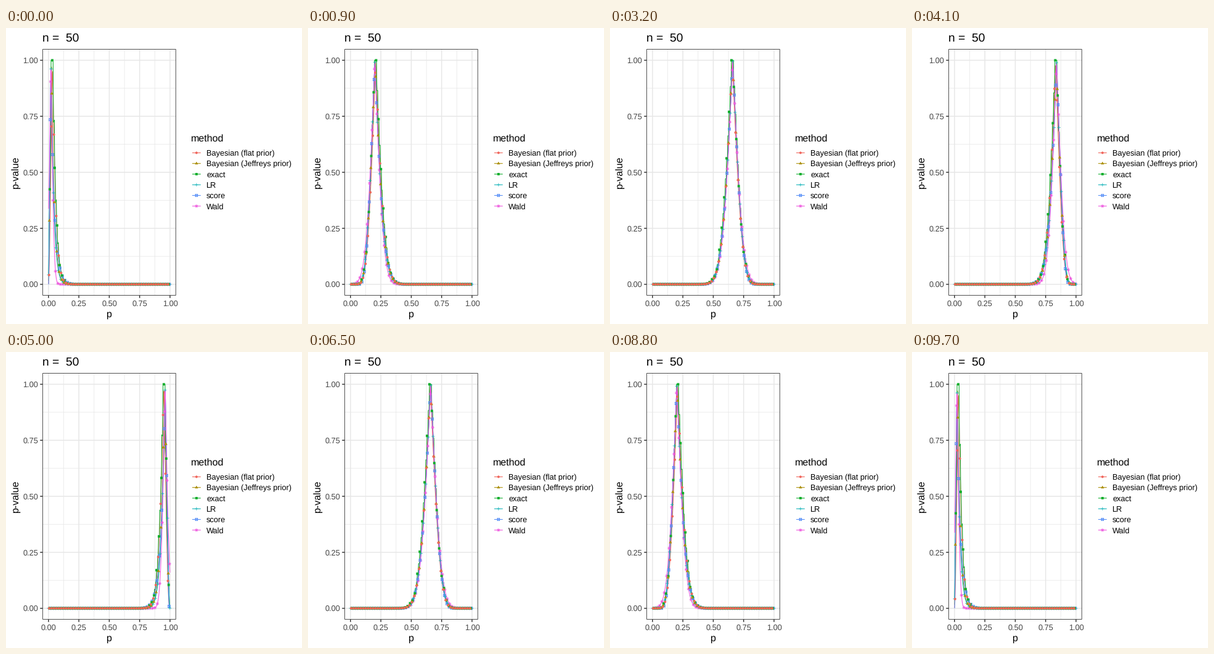
Recreate the animation shown at these times as a matplotlib script. Size 480 px wide and 480 px high, loop 9800 ms.

```python
import math

import matplotlib.pyplot as plt
import numpy as np
from matplotlib.animation import FuncAnimation
from matplotlib.patches import PathPatch
from matplotlib.path import Path

plt.rcParams["font.family"] = "Liberation Sans"
plt.rcParams["text.hinting"] = "no_hinting"

SIZE, DPI = 480, 72          # at 72 dpi one point is one pixel
N = 50
LEFT, RIGHT, TOP, BOTTOM = 59.3, 275.6, 34.2, 433.8
GRID = np.linspace(0.001, 0.999, 301)
LINE_W, STROKE_W, RADIUS = 1.07, 0.71, 1.95

erfc = np.vectorize(math.erfc)
log_choose = np.array([math.lgamma(N + 1) - math.lgamma(k + 1) - math.lgamma(N - k + 1)
                       for k in range(N + 1)])
counts = np.arange(N + 1)
PMF = np.exp(log_choose + counts * np.log(GRID)[:, None]
             + (N - counts) * np.log1p(-GRID)[:, None])
ANGLE = np.linspace(0, np.pi / 2, 4001)
GRID_ANGLE = np.arcsin(np.sqrt(GRID))


# ---- p-value functions of x successes ----
def bayes(x, prior):
    """Two-sided posterior tail for a Beta(prior, prior) prior."""
    a, b = x + prior, N - x + prior
    dens = np.sin(ANGLE) ** (2 * a - 1) * np.cos(ANGLE) ** (2 * b - 1)
    cdf = np.concatenate([[0], np.cumsum(dens[1:] + dens[:-1])])
    lower = np.interp(GRID_ANGLE, ANGLE, cdf / cdf[-1])
    return 2 * np.minimum(lower, 1 - lower)


def exact(x):
    at_x = PMF[:, x:x + 1] * (1 + 1e-7)
    return np.minimum(1, np.where(PMF <= at_x, PMF, 0).sum(axis=1))


def normal_p(z):
    return erfc(np.abs(z) / math.sqrt(2))


def likelihood_ratio(x):
    est = x / N
    dev = 2 * (x * np.log(est / GRID) + (N - x) * np.log((1 - est) / (1 - GRID)))
    return normal_p(np.sqrt(np.maximum(dev, 0)))


def score(x):
    return normal_p((x / N - GRID) / np.sqrt(GRID * (1 - GRID) / N))


def wald(x):
    est = x / N
    return normal_p((est - GRID) / math.sqrt(est * (1 - est) / N))


# ---- marker shapes, in units of RADIUS with y pointing down ----
def strokes(*lines):
    verts = [v for line in lines for v in line]
    codes = [c for line in lines for c in [Path.MOVETO] + [Path.LINETO] * (len(line) - 1)]
    return Path(verts, codes)


R2 = math.sqrt(2)
CROSS = [[(-1, -1), (1, 1)], [(-1, 1), (1, -1)]]
PLUS = [[(-R2, 0), (R2, 0)], [(0, -R2), (0, R2)]]
BOX = [[(-1, -1), (1, -1), (1, 1), (-1, 1), (-1, -1)]]
TRIANGLE = [[(0, -1.555), (1.347, 0.778), (-1.347, 0.778), (0, -1.555)]]

# label, colour, function, shape, filled, slot in the marker cycle
METHODS = [
    ("Bayesian (flat prior)", "#F0655B", lambda x: bayes(x, 1), Path.unit_circle(), True, 1),
    ("Bayesian (Jeffreys prior)", "#AC9008", lambda x: bayes(x, 0.5),
     strokes(*TRIANGLE), True, 2),
    ("exact", "#10AE2C", exact, strokes(*BOX), True, 3),
    ("LR", "#10B2B8", likelihood_ratio, strokes(*PLUS), False, 0),
    ("score", "#578FF8", score, strokes(*BOX, *CROSS), False, 4),
    ("Wald", "#EE54DE", wald, strokes(*PLUS, *CROSS), False, 5),
]


# ---- static picture ----
def to_x(p):
    return LEFT + (RIGHT - LEFT) * ((p - 0.001) / 0.998 + 0.05) / 1.1


def to_y(v):
    return BOTTOM - (BOTTOM - TOP) * (v + 0.05) / 1.1


fig = plt.figure(figsize=(SIZE / DPI, SIZE / DPI), dpi=DPI, facecolor="white")
ax = fig.add_axes([0, 0, 1, 1])
ax.set_xlim(0, SIZE)
ax.set_ylim(SIZE, 0)
ax.axis("off")


def seg(x0, y0, x1, y1, color, width, z=1):
    ax.plot([x0, x1], [y0, y1], color=color, lw=width, zorder=z,
            solid_capstyle="butt", snap=False)


def label(x, y, text, size, color="black", **kw):
    ax.text(x, y, text, fontsize=size, color=color, va="baseline", **kw)


def stamp(shape, xs, ys):
    """One path holding a copy of the shape at every point."""
    centres = np.column_stack([xs, ys])
    verts = centres[:, None] + RADIUS * shape.vertices
    return Path(verts.reshape(-1, 2), np.tile(shape.codes, len(centres)))


def markers(xs, ys, method, z):
    _, color, _, shape, filled, _ = method
    patch = PathPatch(stamp(shape, xs, ys), fc=color if filled else "none",
                      ec="none" if filled else color, lw=0 if filled else STROKE_W,
                      capstyle="butt", zorder=z, snap=False)
    return ax.add_patch(patch)


for i in range(9):
    t = i / 8
    major = i % 2 == 0
    width, z = (1.5, 1.1) if major else (0.78, 1)
    seg(to_x(t), TOP, to_x(t), BOTTOM, "#E7E7E7", width, z)
    seg(LEFT, to_y(t), RIGHT, to_y(t), "#E7E7E7", width, z)
    if major:
        seg(to_x(t), BOTTOM, to_x(t), BOTTOM + 4, "#333333", 1.5)
        seg(LEFT - 4, to_y(t), LEFT, to_y(t), "#333333", 1.5)
        label(to_x(t), 450.7, f"{t:.2f}", 12.8, "#444444", ha="center")
        label(52, to_y(t) + 4.6, f"{t:.2f}", 12.8, "#444444", ha="right")

ax.add_patch(plt.Rectangle((LEFT + 0.3, TOP + 0.3), RIGHT - LEFT - 0.6, BOTTOM - TOP - 0.6,
                           fill=False, ec="#333333", lw=0.85, zorder=6, snap=False))
label(58.8, 22, f"n =  {N}", 19.2)
label(167.5, 468.6, "p", 16, ha="center")
label(19.5, 234, "p-value", 16, ha="center", rotation=90, rotation_mode="anchor")
label(300, 184, "method", 16)

for row, method in enumerate(METHODS):
    y = 202.4 + 17.28 * row
    seg(302, y, 315.8, y, method[1], LINE_W)
    markers([308.9], [y], method, 2)
    label(325, y + 4.6, method[0], 12.8)

# ---- moving curves ----
XS = to_x(GRID)
curves = []
for k, method in enumerate(METHODS):
    line, = ax.plot([], [], color=method[1], lw=LINE_W, zorder=3 + k / 10,
                    solid_capstyle="butt", solid_joinstyle="round", snap=False)
    curves.append((line, markers([0], [0], method, 5 - k / 10)))


def draw(frame):
    x = frame + 1 if frame < N - 1 else 2 * N - 2 - frame
    artists = []
    for method, (line, dots) in zip(METHODS, curves):
        _, _, p_value, shape, _, slot = method
        ys = to_y(p_value(x))
        pick = slice(slot, None, len(METHODS))
        line.set_data(XS, ys)
        dots.set_path(stamp(shape, XS[pick], ys[pick]))
        artists += [line, dots]
    return artists


anim = FuncAnimation(fig, draw, frames=2 * N - 2, interval=100, repeat=True,
                     repeat_delay=0, blit=False)
plt.show()
```
